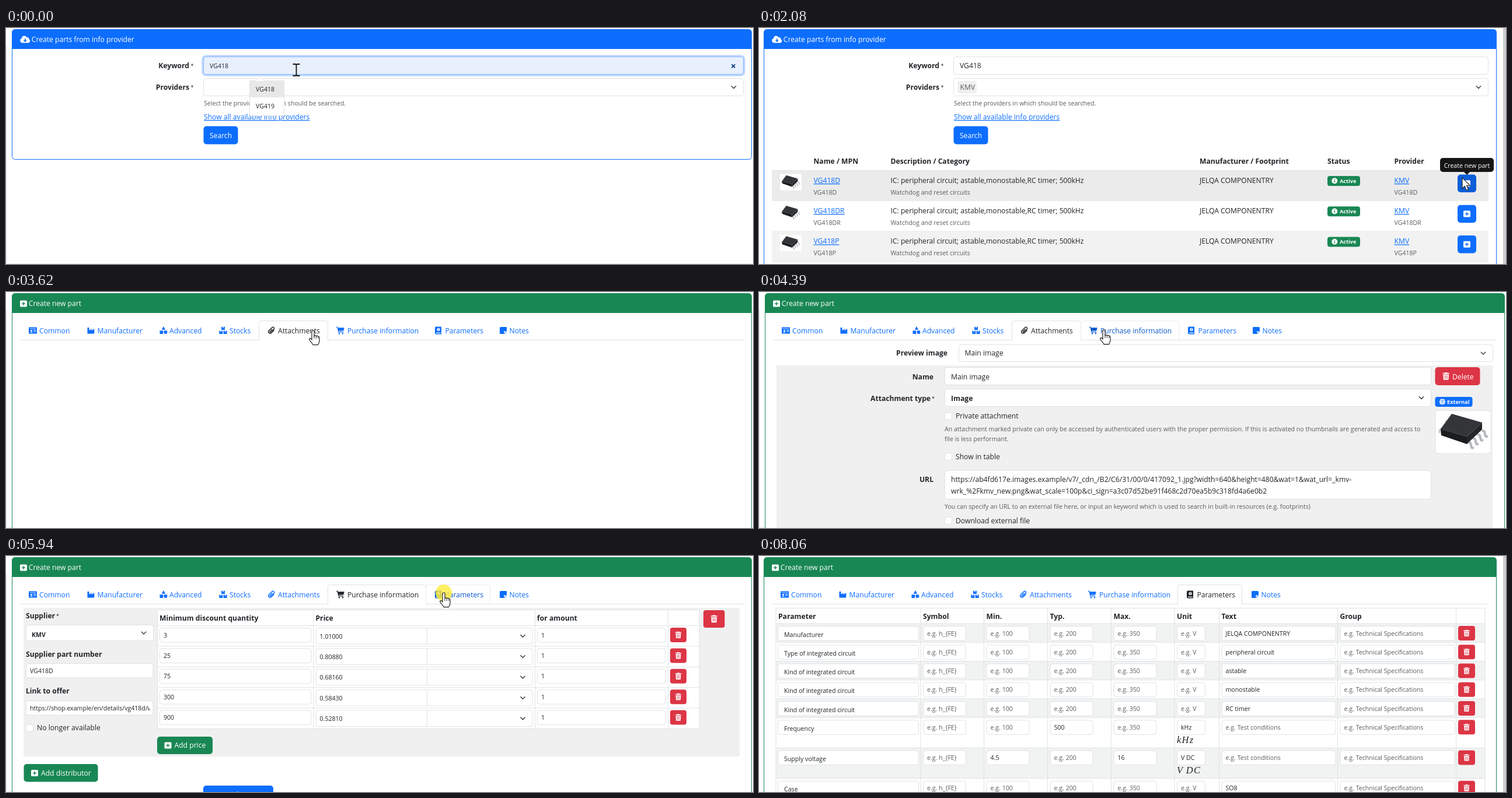
Animation of 1280x405 px, one loop 8480 ms. Source, as an HTML page:

```html
<!DOCTYPE html>
<html lang="en">
<head>
<meta charset="utf-8">
<title>Create parts</title>
<style>
html, body { margin: 0; width: 100%; height: 100%; overflow: hidden; background: #fff; }
svg { display: block; }
text { font: 12.15px "Open Sans", "Noto Sans", sans-serif; fill: #212529; white-space: pre; }
.b { font-weight: 700; }
.s { font-size: 10.6px; }
.x { font-size: 9.2px; }
.m { fill: #595c5f; }
.w { fill: #fff; }
.l { fill: #0d6efd; text-decoration: underline; }
.t { fill: #0d6efd; }
.h { fill: #0a58ca; }
.e { text-anchor: end; }
.c { text-anchor: middle; }
.k { font: italic 16.5px "Liberation Serif", serif; letter-spacing: 1.2px; }
</style>
</head>
<body>
<svg id="stage" width="1280" height="405" viewBox="0 0 1280 405"></svg>
<script>
const BLUE = '#0d6efd', DEEP = '#0b5ed7', GREEN = '#198754', RED = '#dc3545', LINE = '#dee2e6', GRAY = '#f0f0f0';
const PART = 'VG418', SHOP = 'KMV', MAKER = 'JELQA COMPONENTRY';

const range = n => [...Array(n).keys()];
const each = (list, fn) => list.map(fn).join('');
const esc = s => String(s).replace(/&/g, '&amp;');
const text = (x, y, s, cls = '') => `<text x="${x}" y="${y}" class="${cls}">${esc(s)}</text>`;
const rect = (x, y, w, h, fill, stroke = 'none', r = 0) =>
  `<rect x="${x}" y="${y}" width="${w}" height="${h}" rx="${r}" fill="${fill}" stroke="${stroke}"/>`;
const path = (d, fill, stroke = 'none', more = '') =>
  `<path d="${d}" fill="${fill}" stroke="${stroke}" ${more}/>`;
const hline = (x1, x2, y, color = LINE) => path(`M${x1} ${y}H${x2}`, 'none', color);
const vline = (x, y1, y2, color = LINE) => path(`M${x} ${y1}V${y2}`, 'none', color);
const label = (x, y, s) => text(x, y, s, 'b e');
const star = (x, y) => text(x, y - 1, '*', 'x');

const ICONS = {
  cloud: 'M4 12.5a4 4 0 01-1-7.8a4.5 4.5 0 018.6-1.6a3.2 3.2 0 014 3.4a3.2 3.2 0 01-1 6zM8 5v3h-2.2l3 3.2 3-3.2h-2.2v-3z',
  plus: 'M2.5 1.5h9q1.5 0 1.5 1.5v8q0 1.5-1.5 1.5h-9q-1.5 0-1.5-1.5v-8q0-1.5 1.5-1.5zM6.3 4v2.3h-2.3v1.4h2.3v2.3h1.4v-2.3h2.3v-1.4h-2.3v-2.3z',
  card: 'M0 1.5h14v11h-14zM1.5 3.4v.9h11v-.9zM2.5 10.5h4q0-2-2-2t-2 2zM3.2 6h2.6v1.9h-2.6zM8.3 6h4v1h-4zM8.3 8.2h4v1h-4z',
  factory: 'M.5 2h3v5l4-2.8v2.8l4.8-2.8v8.3h-11.8z',
  shapes: 'M7 0l3.3 5.7h-6.6zM.5 7.3h5.7v5.7h-5.7zM10.4 7a3 3 0 100 6 3 3 0 000-6z',
  boxes: 'M4 .8h6v5.2h-6zM6.3.8v2h1.4v-2zM.3 7.4h6v5.6h-6zM2.6 7.4v2h1.4v-2zM7.7 7.4h6v5.6h-6zM10 7.4v2h1.4v-2z',
  clip: 'M11.5 6.5l-5 5a3 3 0 01-4.2-4.2l5.6-5.4a2.1 2.1 0 013 3l-5 4.9a1 1 0 01-1.5-1.4l4-4',
  cart: 'M0 .8h2.5l.4 1.5h10.9l-1.6 5.5h-8l.3 1.3h7.7v1.2h-8.8l-1.8-8.2h-1.6zM5 11a1.3 1.3 0 100 2.6 1.3 1.3 0 000-2.6zM11 11a1.3 1.3 0 100 2.6 1.3 1.3 0 000-2.6z',
  book: 'M3 .5h9v13h-9.5q-1.5-.5-1.5-2v-9q0-2 2-2zM3 10.8v1.3h7.8v-1.3zM7 2.8a2.6 2.6 0 100 5.2 2.6 2.6 0 000-5.2zM6.5 3.6h1v3.6h-1z',
  note: 'M2.5 1h9q1.5 0 1.5 1.5v6l-4.2 4.5h-6.3q-1.5 0-1.5-1.5v-9q0-1.5 1.5-1.5zM8.4 8.2v4l3.8-4z',
  trash: 'M4.7.5h4l.7 1h3v1.5h-11.4v-1.5h3zM1.8 4h9.8l-.6 9.2h-8.6zM4.2 5.6v6h.8v-6zM6.3 5.6v6h.8v-6zM8.4 5.6v6h.8v-6z',
  globe: 'M7 1a6 6 0 100 12 6 6 0 000-12zM1.5 4.8h11v.8h-11zM1.5 8.4h11v.8h-11zM6.5 1h1v12h-1z',
  info: 'M7 1a6 6 0 100 12 6 6 0 000-12zM6.2 3.4h1.7v1.6h-1.7zM6.2 6h1.7v4.5h-1.7z'
};
const icon = (name, x, y, color, k = 1) => {
  const line = name === 'clip';
  return path(ICONS[name], line ? 'none' : color, line ? color : 'none',
    `fill-rule="evenodd" stroke-width="1.4" transform="translate(${x} ${y}) scale(${k})"`);
};

const chevron = (x, y) => path(`M${x - 3.7} ${y - 1.8}l3.7 3.7 3.7-3.7`, 'none', '#343a40', 'stroke-width="1.4" stroke-linecap="round"');
const field = (x, y, w, h, fill = '#fff', stroke = LINE) => rect(x + .5, y + .5, w, h, fill, stroke, 4);
const select = (x, y, w, h) => field(x, y, w, h) + chevron(x + w - 16, y + h / 2 + .5);
const ring = (x, y, w, h) => `<rect x="${x - 1}" y="${y - 1}" width="${w + 3}" height="${h + 3}" rx="6" fill="none" stroke="#bfd8fe" stroke-width="3.5"/>`;
const check = (x, y, s, tx = x + 19) => rect(x + .5, y + .5, 12, 12, '#fff', LINE, 3) + text(tx, y + 10.5, s);
const input = (x, y, w, value, cls = 's') => field(x, y, w, 24.5) + text(x + 7, y + 16.5, value, cls);
const trash = (x, y, w, h, k = .9) =>
  rect(x, y, w, h, RED, 'none', 4) + icon('trash', x + w / 2 - 6.7 * k, y + h / 2 - 7 * k, '#fff', k);

function chip(x, y, k) {
  const pins = each(range(4), i => path(`M${56 + i * 8} ${54 - i * 6.5}l4 2 2 8 4 1`, 'none', '#b4b7bb', 'stroke-width="4"'));
  return `<g transform="translate(${x} ${y}) scale(${k})">` +
    path('M13 30l-6 4v5M22 17l-5 4', 'none', '#c4c6c9', 'stroke-width="3"') + pins +
    path('M28 6L80 21L54 45L9 32z', '#343538') + path('M9 32L54 45V58L10 43z', '#1b1c1e') +
    path('M54 45L80 21V33L54 58z', '#242527') + '</g>';
}

function card(wide, color, name, title, bottom = 420) {
  const x = wide ? 10.5 : 8.5, w = wide ? 1267 : 1255;
  return rect(x, 2.5, w, bottom - 2.5, '#fff', color, 5) +
    path(`M${x} 36V7.5q0-5 5-5h${w - 10}q5 0 5 5V36z`, color) +
    icon(name, x + (name === 'plus' ? 12.5 : 13.5), 13, '#fff') +
    text(x + (name === 'plus' ? 28.3 : 33.3), 24, title, 'w') +
    (wide ? '' : rect(1275, 0, 5, 405, '#cdcdcd'));
}
const edges = vline(.5, 31, 405) + hline(0, 1280, 404.5, '#ececec');

function searchPage({ wide = true, focus = '', filled = true, tint = true, hover = false }) {
  const dx = wide ? 0 : -5, x = 338 + dx, w = wide ? 925 : 916, typing = focus === 'keyword';
  return (wide ? edges : '') + card(wide, BLUE, 'cloud', 'Create parts from info provider', wide ? 225.5 : 420) +
    label(314 + dx, 69, 'Keyword') + star(316.5 + dx, 69) +
    label(314 + dx, 106, 'Providers') + star(316.5 + dx, 106) +
    (typing ? ring(x, 49, w, 30) : '') +
    field(x, 49, w, 30, tint ? '#e8f0fe' : '#fff', typing ? '#86b7fe' : LINE) +
    text(x + 11, 69, PART, typing ? 's' : '') +
    (typing ? path('M1243.3 62.3l6 6m0-6l-6 6', 'none', '#0a3a7d', 'stroke-width="1.8"') : '') +
    (focus === 'provider' ? ring(x, 86, w, 30) : '') + select(x, 86, w, 30) +
    (filled ? rect(x + 7, 91, 33, 21, '#efefef', 'none', 4) + text(x + 11.5, 106, SHOP, 'm') : '') +
    text(x + 1, 132.5, 'Select the providers in which should be searched.', 's m') +
    text(x + 1, 157, 'Show all available info providers', 'l') +
    rect(x + .5, 168.5, 59, 31, hover ? DEEP : BLUE, 'none', 5) + text(x + 30, 188.5, 'Search', 'w c');
}

const suggestions = path('M417.5 90.5H428l7-8 7 8h34.5v60h-59z', '#fff', '#e4e4e4') +
  rect(418, 91, 59, 28, '#e8e8e9') + text(428, 108.5, PART, 's') + text(428, 137.5, 'VG419', 's');

function resultRow(code, i, hover) {
  const y = 244.5 + i * 52.2, bg = hover ? '#ebebeb' : i % 2 ? '#fff' : '#f2f2f2';
  return rect(22, y, 1228, 52.2, bg) + hline(22, 1250, y + 52.2) +
    rect(36, y + 6, 37, 28, '#fff') + chip(36, y + 6, .38) +
    text(93.5, y + 21.5, code, 'l') + text(93.5, y + 41, code, 's m') +
    text(225.5, y + 21.5, 'IC: peripheral circuit; astable,monostable,RC timer; 500kHz') +
    text(225.5, y + 41, 'Watchdog and reset circuits', 's m') + text(755, y + 21.5, MAKER) +
    rect(974, y + 9.5, 56, 17, GREEN, 'none', 4) + icon('info', 980.5, y + 12, '#fff', .83) +
    text(995, y + 21.5, 'Active', 'x b w') +
    text(1088.5, y + 21.5, SHOP, 'l') + text(1088.5, y + 41, code, 's m') +
    rect(1197, y + 7, 32, 30.5, hover ? DEEP : BLUE, 'none', 5) + icon('plus', 1206, y + 15.3, '#fff');
}

function results(hover) {
  const heads = [[93.5, 'Name / MPN'], [225.5, 'Description / Category'], [755, 'Manufacturer / Footprint'], [974, 'Status'], [1088.5, 'Provider']];
  return searchPage({ wide: false, tint: false, hover: !hover }) +
    each(heads, ([x, s]) => text(x, 233, s, 'b')) + hline(22, 1250, 244.5) +
    each(['D', 'DR', 'P'], (suffix, i) => resultRow(PART + suffix, i, hover && !i)) +
    (hover ? rect(1167, 223, 92, 24, '#161616', 'none', 5) + path('M1208 247h10l-5 5z', '#161616') +
      text(1213, 239.5, 'Create new part', 's w c') : '');
}

const TABS = [
  ['Common', 'card', 24.5, 124, 57], ['Manufacturer', 'factory', 124.5, 248, 156.5], ['Advanced', 'shapes', 248.5, 350, 280],
  ['Stocks', 'boxes', 350.5, 433, 383], ['Attachments', 'clip', 433.5, 551.5, 466], ['Purchase information', 'cart', 551.5, 719.5, 585],
  ['Parameters', 'book', 719.5, 829.5, 752.5], ['Notes', 'note', 830.5, 911, 862.5]
];
function tabs(active, hover, wide) {
  const dx = wide ? 0 : -2;
  return hline(24 + dx, wide ? 1264 : 1250, 82.5) + each(TABS, ([name, ic, l, r, tx], i) => {
    const on = i === active, over = i === hover;
    const shape = `M${l + dx} 83V54q0-4.5 4.5-4.5h${r - l - 9}q4.5 0 4.5 4.5V83`;
    return (on ? path(shape, '#fff', LINE) : over ? path(shape, 'none', '#e9ecef') : '') +
      icon(ic, l + dx + 14.5, 59, on ? '#212529' : over ? '#0a58ca' : BLUE) +
      text(tx + dx, 70.5, name, on ? '' : over ? 'h' : 't');
  });
}

function partPage(active, body, { fade = 1, hover = -1, line = true, after = '' } = {}) {
  const wide = active !== 6;
  return (wide && line ? edges : '') + card(wide, GREEN, 'plus', 'Create new part') +
    tabs(active, hover, wide) + `<g opacity="${fade}">${body}</g>` + after;
}

const save = y => rect(338, y, 120, 31, BLUE, 'none', 5) + text(398, y + 20, 'Save changes', 'w c');

const common = label(314, 109, 'Name') + star(316.5, 109) + field(338, 90, 919, 30) + text(349, 109, PART + 'D') +
  label(314, 204, 'Description') + field(338, 127, 919, 144) +
  text(349, 151, 'IC: peripheral circuit; astable,monostable,RC timer; 500kHz') +
  label(320, 297, 'Minimum Stock') + field(338, 278, 919, 30) + text(349, 297, '0') +
  label(320, 336, 'Category') + select(338, 316, 919, 30) + save(371);

const attachments = label(323, 109, 'Preview image') + select(342, 90, 915, 29) + text(352.5, 109, 'Main image') +
  rect(30, 126, 1227, 280, GRAY) +
  label(299, 149.5, 'Name') + field(318, 129, 833, 30) + text(329, 149.5, 'Main image') +
  rect(1158.5, 129, 77, 31, RED, 'none', 5) + icon('trash', 1170.5, 137.5, '#fff') + text(1188, 149.5, 'Delete', 'w') +
  label(294, 186.5, 'Attachment type') + star(296, 186.5) + select(318, 166, 833, 30) + text(329, 186.5, 'Image', 'b') +
  rect(1158.5, 180, 64, 17, BLUE, 'none', 4) + icon('globe', 1165, 182.5, '#fff', .85) + text(1179, 192, 'External', 'x b w') +
  field(1158.5, 203, 95, 73.5) + chip(1159, 203, 1) +
  check(318, 206.5, 'Private attachment') +
  text(318, 239, 'An attachment marked private can only be accessed by authenticated users with the proper permission. If this is activated no thumbnails are generated and access to', 's m') +
  text(318, 255.5, 'file is less performant.', 's m') + check(318, 276, 'Show in table') +
  label(299, 326, 'URL') + field(318, 306, 833, 49) +
  text(329, 326, 'https://ab4fd617e.images.example/v7/_cdn_/B2/C6/31/00/0/417092_1.jpg?width=640&height=480&wat=1&wat_url=_kmv-') +
  text(329, 345.5, 'wrk_%2Fkmv_new.png&wat_scale=100p&ci_sign=a3c07d52be91f468c2d70ea5b9c318fd4a6e0b2') +
  text(318, 372, 'You can specify an URL to an external file here, or input an keyword which is used to search in built-in resources (e.g. footprints)', 's m') +
  check(318, 386, 'Download external file');

const PRICES = [[3, '1.01000'], [25, '0.80880'], [75, '0.68160'], [300, '0.58430'], [900, '0.52810']];
const purchase = rect(30, 89, 1227, 255, GRAY) +
  text(34, 107, 'Supplier', 'b') + star(86, 107) + select(34, 118, 218, 27) + text(44, 139, SHOP, 's b') +
  text(34, 173, 'Supplier part number', 'b') + input(34, 184, 217.5, PART + 'D') +
  text(34, 236, 'Link to offer', 'b') + field(34, 248, 217.5, 24.5) +
  '<svg x="41" y="248" width="205" height="25">' + text(0, 16.5, 'https://shop.example/en/details/vg418d/wide', 's') + '</svg>' +
  check(34, 288.5, 'No longer available') +
  rect(259.5, 92.5, 928.5, 204, '#fff', LINE) + each([527, 906.5, 1134.5], x => vline(x, 92.5, 296.5)) +
  each([[263, 'Minimum discount quantity'], [530.5, 'Price'], [910, 'for amount']], ([x, s]) => text(x, 110.5, s, 'b')) +
  each(PRICES, ([qty, price], i) => {
    const y = 119.5 + i * 35.4;
    return hline(259.5, 1188, y) + input(263, y + 3.5, 259.5, qty) +
      select(530.5, y + 3.5, 371, 27.5) + vline(721.5, y + 4, y + 31) + text(537.5, y + 22, price, 's') +
      input(910, y + 3.5, 219.5, 1) + trash(1138, y + 3.5, 28, 25);
  }) +
  trash(1195, 93, 36.5, 30, 1) +
  rect(259, 310, 95, 30, GREEN, 'none', 5) + icon('plus', 270.5, 318, '#fff') + text(288.5, 329, 'Add price', 'w') +
  rect(30.5, 357, 127, 30.5, GREEN, 'none', 5) + icon('plus', 42, 365.5, '#fff') + text(60, 376.5, 'Add distributor', 'w');

const COLS = [
  [29, 'Parameter', 241, ''], [277, 'Symbol', 73, 'e.g. h_{FE}'], [385.5, 'Min.', 73, 'e.g. 100'], [494.5, 'Typ.', 73, 'e.g. 200'],
  [603.5, 'Max.', 73, 'e.g. 350'], [712, 'Unit', 48, 'e.g. V'], [788.5, 'Text', 195, 'e.g. Test conditions'], [991.5, 'Group', 196, 'e.g. Technical Specifications']
];
// Row values are keyed by column index.
const KIND = 'Kind of integrated circuit';
const PARAMS = [
  { 0: 'Manufacturer', 6: MAKER }, { 0: 'Type of integrated circuit', 6: 'peripheral circuit' },
  { 0: KIND, 6: 'astable' }, { 0: KIND, 6: 'monostable' }, { 0: KIND, 6: 'RC timer' },
  { 0: 'Frequency', 3: '500', 5: 'kHz' }, { 0: 'Supply voltage', 2: '4.5', 4: '16', 5: 'V DC' }, { 0: 'Case', 6: 'SO8' }
];
function paramTable() {
  let y = 116;
  const rows = each(PARAMS, (row, i) => {
    const top = y, h = row[5] ? 52.2 : 32.25;
    y += h;
    return rect(29, top, 1215, h, i % 2 ? '#fff' : '#f1f2f2') + hline(29, 1244, top) +
      each(COLS, ([x, , w, hint], c) => c
        ? input(x + 4, top + 4, w, row[c] || hint, row[c] ? 's' : 's m')
        : field(32, top + 4, w, 24.5) + text(43, top + 22.5, row[0], 's')) +
      (row[5] ? text(716, top + 43.5, row[5].replace(' ', '\u2009'), 'k') : '') + trash(1198, top + 4, 29, 25);
  });
  return rows + rect(29, 89.5, 1215, 330, 'none', LINE) +
    each([...COLS.slice(1).map(c => c[0]), 1194.5], x => vline(x, 89.5, 405)) +
    each(COLS, ([x, s]) => text(x + 4, 107.5, s, 'b'));
}
const params = paramTable();

const CURSORS = {
  beam: path('M-6-10h4q2 0 2 2 0-2 2-2h4M0-8v16M-6 10h4q2 0 2-2 0 2 2 2h4', 'none', '#111', 'stroke-width="1.8"'),
  arrow: path('M0 0v18.5l4.3-4 3 7 3.2-1.4-3-6.7h6z', '#fff', '#222', 'stroke-width="1.1"'),
  hand: path('M-2 2q0-2 2-2t2 2v7.5q1.8-1.6 3.4.2 2-1.2 3.4.7 2.2-.6 2.2 2v5q0 4-2.5 7.2h-8.5q-1.5-3-5.5-7.5-2-3.2.5-3.5 1.5 0 3 2z', '#fff', '#222', 'stroke-width="1.2"') +
    path('M2 9v5M5.4 10v4M8.8 11v3', 'none', '#222')
};
const cursor = (kind, x, y) => `<g transform="translate(${x} ${y})">${CURSORS[kind]}</g>`;
const glow = '<circle cx="750" cy="63" r="14" fill="#ffeb3b" opacity=".8"/>';

const LOOP = 8480;
const STEPS = [
  [0, searchPage({ focus: 'keyword', filled: false }) + suggestions + cursor('beam', 497.5, 72)],
  [340, searchPage({ focus: 'provider' }) + cursor('arrow', 506, 136)],
  [670, searchPage({}) + cursor('arrow', 510.5, 188.5)],
  [1080, results(false) + cursor('arrow', 368, 184)],
  [2080, results(true) + cursor('arrow', 1205, 257)],
  [2490, partPage(0, common, { fade: 0, line: false }) + cursor('arrow', 1205, 257)],
  [2820, partPage(0, common) + cursor('arrow', 790, 150)],
  [3620, partPage(4, attachments, { fade: 0 }) + cursor('hand', 526, 66)],
  [4040, partPage(4, attachments, { fade: .5 }) + cursor('hand', 540, 66)],
  [4390, partPage(4, attachments, { hover: 5 }) + cursor('hand', 591, 65)],
  [5190, partPage(5, purchase, { fade: 0, after: save(394) }) + cursor('hand', 591, 65)],
  [5520, partPage(5, purchase, { fade: .5, after: save(394) }) + cursor('hand', 660, 65)],
  [5940, partPage(5, purchase, { hover: 6, after: save(394) }) + glow + cursor('hand', 750, 63)],
  [6740, partPage(6, params, { fade: 0 }) + cursor('hand', 750, 63)],
  [7150, partPage(6, params, { fade: .4 }) + cursor('hand', 755, 64)],
  [7570, partPage(6, params, { fade: .8 }) + cursor('hand', 755, 64)],
  [8060, partPage(6, params)]
];

const stage = document.getElementById('stage');
stage.innerHTML = each(STEPS, ([, art]) => `<g display="none">${art}</g>`);
const scenes = [...stage.children];
let shown = -1;
function tick() {
  const time = performance.now() % LOOP;
  const now = STEPS.filter(([start]) => start <= time).length - 1;
  if (now !== shown) {
    scenes.forEach((g, i) => g.setAttribute('display', i === now ? 'inline' : 'none'));
    shown = now;
  }
  requestAnimationFrame(tick);
}
tick();
</script>
</body>
</html>
```
